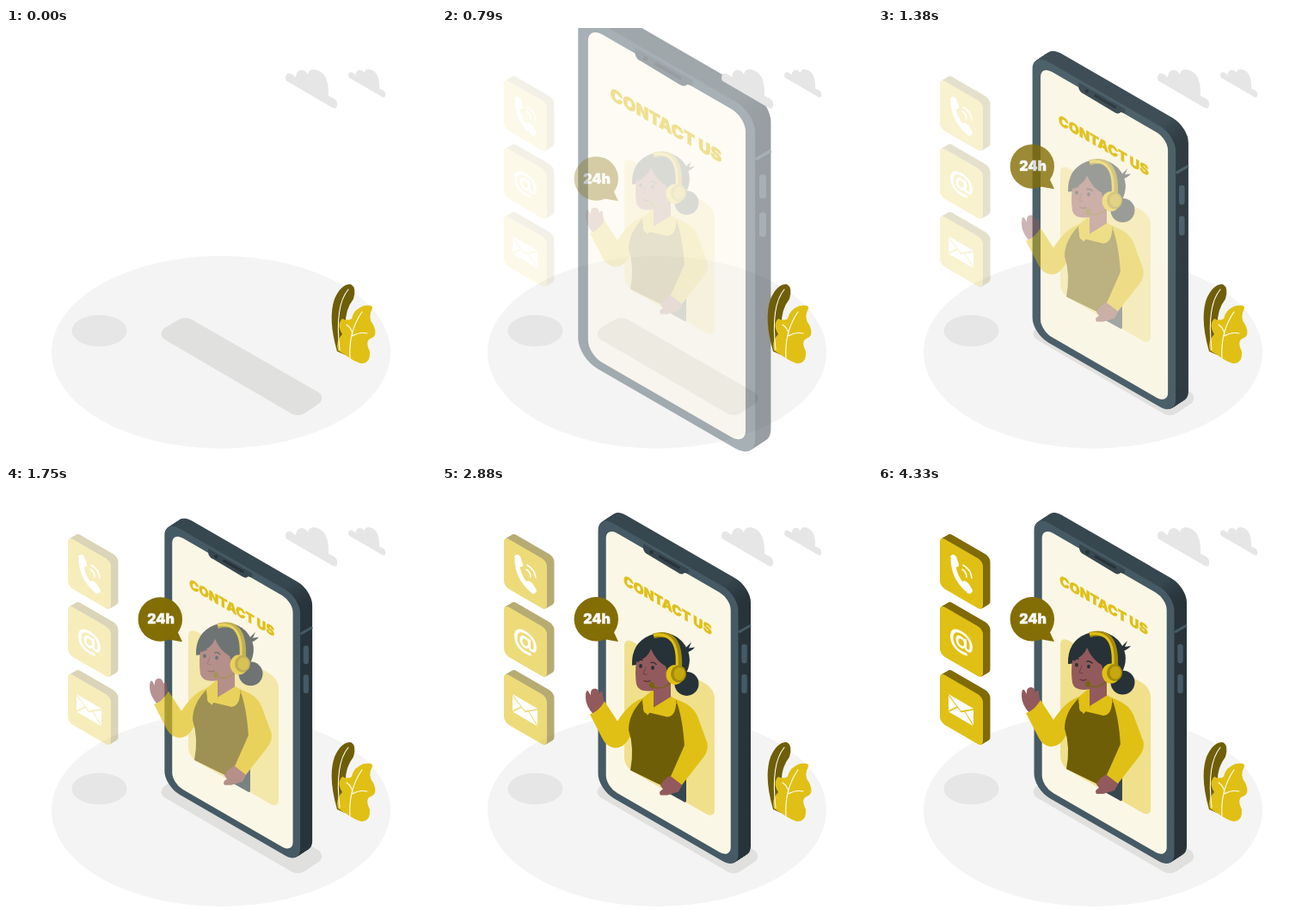
Write an HTML page that moves like this. It is 500 px wide and 500 px high and loops after 4430 ms.

```html
<!DOCTYPE html>
<html lang="en">
<head>
<meta charset="utf-8">
<title>Contact us</title>
<style>
html, body { margin: 0; width: 100%; height: 100%; overflow: hidden; background: #fff; }
svg { display: block; width: 100vw; height: 100vh; }
text { font-family: Inter, "Open Sans", sans-serif; font-weight: 900; }
</style>
</head>
<body>
<svg viewBox="0 0 500 500">
  <defs>
    <linearGradient id="body" gradientUnits="userSpaceOnUse" x1="143" y1="0" x2="164" y2="0">
      <stop offset="0" stop-color="#37474f"/>
      <stop offset="1" stop-color="#263238"/>
    </linearGradient>
    <rect id="tile" width="50" height="58" rx="6"/>
    <path id="cloud" fill="#e6e6e6" d="M327 62L380 93Q386 95 385 87Q384 82 375 79Q376 50 358 48Q352 48 351 54Q347 47 340 50Q337 53 337 57L331 53Q325 52 325 58Q325 61 327 62Z"/>
  </defs>

  <ellipse cx="250" cy="377" rx="197" ry="112" fill="#f4f4f4"/>
  <ellipse cx="108.5" cy="352" rx="32" ry="18.3" fill="#e6e6e6"/>
  <path fill="#e0e0de" d="M184 349L200 339.500Q208 335 216 339L364 424Q370 430 365 436L347 448Q341 452 333 449L184 362Q177 356 184 349Z"/>

  <g id="phone">
    <g id="shell"></g>
    <rect width="163" height="319.500" rx="18" fill="#455a64" transform="matrix(1 .577 0 1 181.500 33)"/>
    <rect width="145" height="302" rx="13" fill="#fbf7e6" transform="matrix(1 .577 0 1 190.700 47.500)"/>
    <path fill="#37474f" d="M234 67V73Q235 78 240 80L274 100.500Q279 104 282 101L287 102V97Z"/>
    <circle cx="243.500" cy="77" r="2.200" fill="#263238"/>
    <path d="M253 82L275.500 95" stroke="#263238" stroke-width="3" stroke-linecap="round"/>
    <path d="M345 170L359 162" stroke="#455a64" stroke-width="3"/>
    <g stroke="#455a64" stroke-width="6.500" stroke-linecap="round"><path d="M351.500 187V203M351.500 222V238"/></g>
    <text transform="matrix(1 .577 0 1 211.300 114.500)" font-size="15.400" fill="#dfc01a" stroke="#dfc01a" stroke-width=".5">CONTACT US</text>
  </g>

  <g id="agent">
    <rect width="105" height="151" rx="10" fill="#f0e08c" transform="matrix(1 .577 0 1 212 174)"/>
    <path fill="#37474f" d="M262 345L284 338V364Q284 368 280 365L262 355Z"/>
    <!-- left arm -->
    <path fill="#925a5c" d="M176 264Q167 254 167 244Q167 235 170 237L173 242Q172 234 178 234Q182 234 183 240Q187 235 187 241Q187 247 190 252Z"/>
    <path fill="#e0c014" d="M172 264Q182 261 189 249L204 272Q218 250 234 245L246 262L218 291Q211 304 200 303Q191 301 187 293Z"/>
    <!-- body -->
    <path fill="#e0c014" d="M231 247L246 235L267 244L276 248Q292 254 297 266L308 296L283 304L270 280H230Z"/>
    <path fill="#6f5e08" d="M234 246Q217 263 217 282Q224 304 219 329L264 351Q277 344 278 336Q272 320 282 302Q280 268 272 247Q273 266 262 267L241 262Q231 266 235 247Z"/>
    <path fill="#925a5c" d="M246 232L266 226V246L246 258Z"/>
    <path fill="#e0c014" d="M246 236L233 247Q233 258 239 265L246 257L262 267L273 251L267 243L246 256Z"/>
    <!-- right forearm crosses the vest -->
    <path fill="#925a5c" d="M266 335L280 345L275 354L262 358L254 358Q251 354 257 351L254 347Q258 339 266 335Z"/>
    <path fill="#e0c014" d="M282 300L308 295Q311 305 304 314L279 346L266 336Z"/>
    <!-- head -->
    <circle cx="284.500" cy="228.500" r="14" fill="#263238"/>
    <path fill="#263238" d="M280 190L290 180L287 187L294 186Q290 191 282 193Z"/>
    <path fill="#263238" d="M221 207Q220 181 242 172Q263 164 279 179Q293 195 285 214L262 228L232 206Z"/>
    <path fill="#925a5c" d="M226 203Q239 199 243 188Q249 202 260 208L266 226Q254 237 240 237Q228 237 226 229Q224 215 226 203Z"/>
    <g fill="#263238">
      <ellipse cx="231" cy="208" rx="1.900" ry="2.300"/>
      <ellipse cx="245" cy="210" rx="1.900" ry="2.300"/>
    </g>
    <g fill="none" stroke="#263238" stroke-linecap="round">
      <path d="M228 203Q230 200 233 201M243 204Q247 203 249 206" stroke-width="1.400"/>
      <path d="M235 225Q239 227 242 225" stroke="#5d3237" stroke-width="1.300"/>
      <path d="M237 209L234 217L238 218" stroke="#703f43"/>
    </g>
    <path fill="none" stroke="#a38a09" stroke-width="6" d="M246 173Q278 164 276 210"/>
    <path fill="none" stroke="#e0c014" stroke-width="3" d="M246 172Q276 167 273 210"/>
    <path fill="none" stroke="#766510" stroke-width="1.300" d="M267 226Q256 237 245 232"/>
    <ellipse cx="244" cy="230" rx="3" ry="3.500" fill="#766510"/>
    <ellipse cx="271" cy="218" rx="10.500" ry="11.500" fill="#e0c014"/>
    <ellipse cx="275" cy="217" rx="9" ry="10" fill="#a38a09"/>
    <ellipse cx="276" cy="217" rx="6.500" ry="7.500" fill="#c5a70e"/>
  </g>

  <g id="bubble">
    <circle cx="179.300" cy="154.800" r="25.700" fill="#836d05"/>
    <path d="M188 178L205 181L199 168Z" fill="#836d05"/>
    <text x="180" y="160.300" font-size="16" text-anchor="middle" fill="#fff" stroke="#fff" stroke-width=".4">24h</text>
  </g>

  <g id="icons">
    <g class="icon">
      <path fill="none" stroke="#fff" stroke-width="5" stroke-linecap="round" d="M87 86Q88 107 103 120"/>
      <path fill="#fff" d="M84 82Q87 77 91 82L94 91Q95 95 89 94ZM98 111Q101 109 105 113L110 121Q110 126 104 125Z"/>
      <path fill="none" stroke="#fff" stroke-width="1.500" stroke-linecap="round" d="M98 97Q103 100 103 106M99 92Q108 97 109 107"/>
    </g>
    <g class="icon" transform="translate(0 79)">
      <text transform="matrix(1 .577 0 1 97 110)" font-size="28" style="font-weight:700" text-anchor="middle" fill="#fff">@</text>
    </g>
    <g class="icon" transform="translate(0 158)">
      <g transform="matrix(1 .577 0 1 82 84)">
        <rect width="29" height="20.500" rx="1" fill="#fff"/>
        <path fill="none" stroke="#e0c014" stroke-width="1.300" d="M0 1L14.500 12L29 1M0 20L10.500 9M29 20L18.500 9"/>
      </g>
    </g>
  </g>

  <use href="#cloud"/>
  <use href="#cloud" transform="translate(164 13.400) scale(.72)"/>

  <path fill="#6f5e08" d="M385 376Q374 338 382 315Q390 297 401 298Q408 302 404 315Q394 328 395 345L394 380Z"/>
  <path fill="#e0c014" d="M386 375Q383 364 391 356Q384 345 391 338Q397 341 402 338Q404 327 416 323Q427 321 426 326Q420 337 427 345Q433 358 424 361Q417 364 423 376Q424 390 413 390Q405 388 394 380Z"/>
  <g fill="none" stroke="#fff" stroke-width="1.100" stroke-linecap="round">
    <path d="M398 304Q382 323 388 374"/>
    <path d="M400 384Q398 353 414 330M396 345Q402 349 403 356M403 358Q411 353 420 355"/>
  </g>
</svg>
<script>
const LOOP = 4430, FIRST = 80, STEP = 1000 / 24;
const SVG = "http://www.w3.org/2000/svg";
const $ = id => document.getElementById(id);
const clamp = v => Math.min(1, Math.max(0, v));

function add(parent, tag, attrs, before = null) {
  const el = document.createElementNS(SVG, tag);
  for (const name in attrs) el.setAttribute(name, attrs[name]);
  return parent.insertBefore(el, before);
}

const skewed = (x, y) => `matrix(1 .577 0 1 ${x} ${y})`;

// Solid sides are the front outline swept backwards.
for (let d = 1; d >= 0; d -= 1 / 20) {
  add($("shell"), "rect", {
    width: 163, height: 319.5, rx: 18, fill: "url(#body)",
    transform: skewed(181.5 + 14.5 * d, 33 - 9.5 * d)
  });
}

for (const icon of document.querySelectorAll(".icon")) {
  const symbol = icon.firstElementChild;
  const tile = (d, fill) => add(icon, "use", {
    href: "#tile", fill, transform: skewed(72 + 8.5 * d, 58.5 - 5 * d)
  }, symbol);
  for (let d = 1; d > 0.05; d -= 1 / 12) tile(d, "#806b09");
  tile(0, "#e0c014");
}

const cubic = (a, b, u) => 3 * (1 - u) ** 2 * u * a + 3 * (1 - u) * u * u * b + u ** 3;

// Overshooting ease, cubic-bezier(.36, -.01, .5, 1.38)
function ease(x) {
  if (x <= 0) return 0;
  if (x >= 1) return 1;
  let lo = 0, hi = 1;
  for (let i = 0; i < 30; i++) {
    const mid = (lo + hi) / 2;
    if (cubic(0.36, 0.5, mid) < x) lo = mid; else hi = mid;
  }
  return cubic(-0.01, 1.38, lo);
}

function pose(id, opacity, transform) {
  $(id).setAttribute("opacity", clamp(opacity));
  if (transform) $(id).setAttribute("transform", transform);
}

function draw(time) {
  const t = time < FIRST ? -100 : FIRST + Math.floor((time - FIRST + 4) / STEP) * STEP;

  const zoom = ease((t + 25) / 2190);
  pose("phone", zoom, `translate(270 235.5) scale(${1.5 - 0.5 * zoom}) translate(-270 -235.5)`);

  const drop = ease((t + 15) / 3850);
  pose("agent", drop, `translate(0 ${30 * (drop - 1)})`);

  const rise = ease((t - 20) / 2560);
  pose("bubble", rise, `translate(0 ${30 * (1 - rise)})`);

  pose("icons", clamp(t / 4330) ** 1.4);
}

const start = performance.now();
function tick() {
  draw((performance.now() - start) % LOOP);
  requestAnimationFrame(tick);
}
tick();
</script>
</body>
</html>
```
